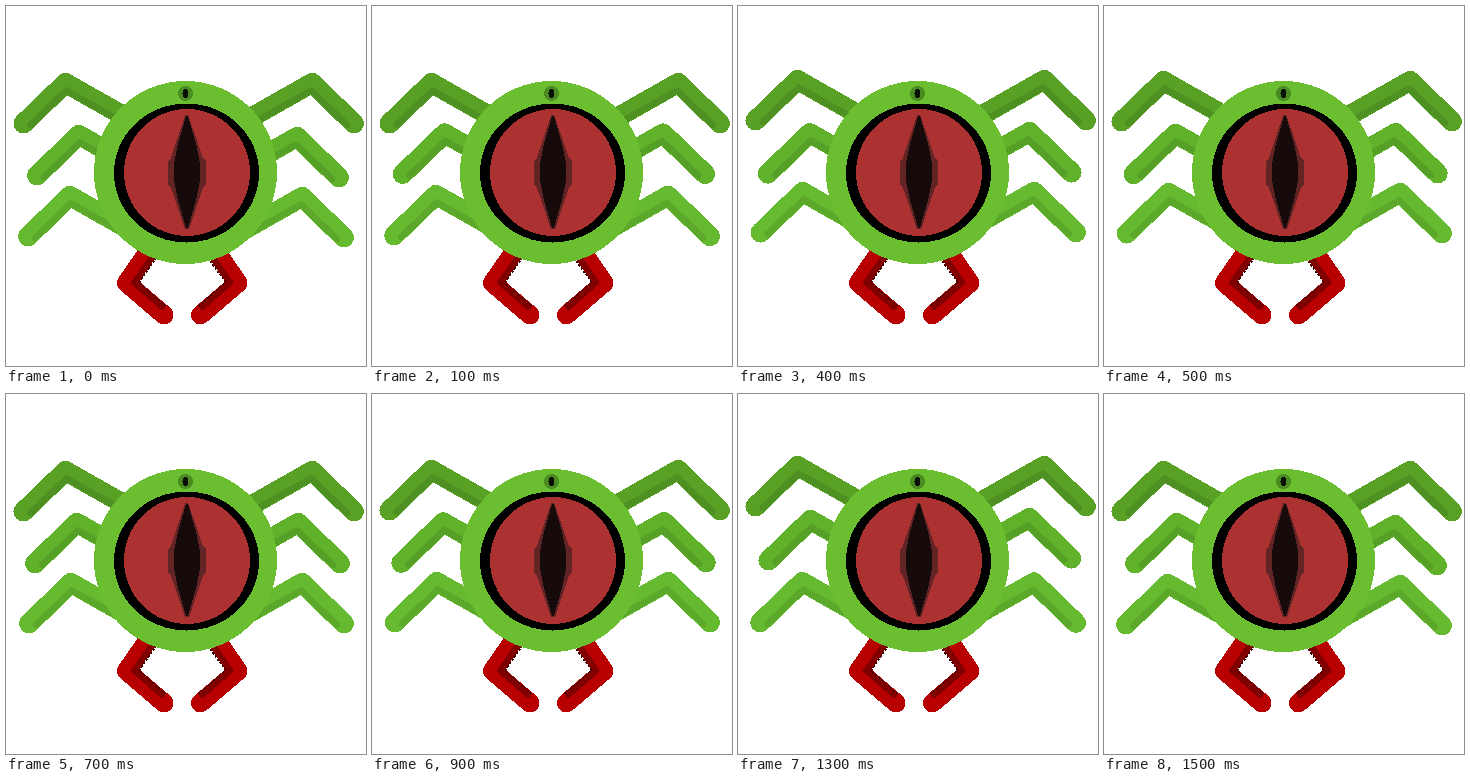
Recreate the animation shown at these times as an HTML page. Size 360 by 360 pixels, loop 1600 ms.

```html
<!DOCTYPE html>
<html lang="en">
<head>
<meta charset="utf-8">
<title>Eye spider</title>
<style>
  html, body { margin: 0; width: 100%; height: 100%; overflow: hidden; background: #fff; }
  svg { display: block; width: 100%; height: 100%; }
  .limb path { fill: none; stroke-linecap: round; stroke-linejoin: round; }
</style>
</head>
<body>
<svg viewBox="0 0 360 360" shape-rendering="crispEdges">
  <g id="legs"></g>
  <g id="claws"></g>
  <circle cx="179.5" cy="166.5" r="91.5" fill="#6abe30"/>
  <ellipse cx="180.5" cy="167" rx="72.5" ry="69.5" fill="#000"/>
  <ellipse cx="181" cy="166.5" rx="63" ry="63.5" fill="#ac3232"/>
  <path d="M179 109H182L192 137L197 152L200 155V178L197 182L183 223H179L165 182L162 178V155L165 152Z" fill="#622424"/>
  <path d="M180 110H182L190 138L194 157V175L190 194L182 222H180L172 194L168 175V157L172 138Z" fill="#160a0a"/>
  <circle cx="179.5" cy="87.5" r="7.5" fill="#4a8c22"/>
  <ellipse cx="179.5" cy="87.5" rx="3" ry="4.8" fill="#071003"/>
</svg>
<script>
const STEP = 100, LAST = 7;

// Each leg rises to its peak pose, sinks again, and drifts towards (driftX, driftY).
const upper = { light: '#58a125', shade: '#4e9022', start: 1, peak: 2 };
const middle = { light: '#61b22b', shade: '#56a027', start: 0, peak: 2 };
const lower = { light: '#66ba2f', shade: '#5ca82a', start: 0, peak: 4 };
const legs = [
  { ...upper, x: 59.5, y: 77, side: 1, lift: 5, driftX: 0, driftY: 0 },
  { ...upper, x: 306, y: 77, side: -1, lift: 5, driftX: 0, driftY: 0 },
  { ...middle, x: 73, y: 129, side: 1, lift: 3, driftX: -2, driftY: 0 },
  { ...middle, x: 291, y: 131, side: -1, lift: 6.4, driftX: 1, driftY: -2 },
  { ...lower, x: 64, y: 190, side: 1, lift: 3.4, driftX: 1, driftY: -1 },
  { ...lower, x: 296, y: 191, side: -1, lift: 4, driftX: 0, driftY: -2 }
];

function addLimb(parentId, markup) {
  const group = document.createElementNS('http://www.w3.org/2000/svg', 'g');
  group.setAttribute('class', 'limb');
  group.innerHTML = markup;
  document.getElementById(parentId).append(group);
  return group;
}

for (const leg of legs) {
  leg.node = addLimb('legs', `
    <path d="M-42 40.5L0 0L60 34" stroke="${leg.light}" stroke-width="20"/>
    <path d="M-35 42L1 7.4L57 39" stroke="${leg.shade}" stroke-width="6.5"/>`);
}

for (const mirror of ['', 'translate(352.5) scale(-1 1)']) {
  addLimb('claws', `
    <path d="M146 240L120.5 277L158 309" stroke="#b80000" stroke-width="19"/>
    <path d="M152 243L128.5 276.5L156 300.5" stroke="#800000" stroke-width="6.5"/>
    <path d="M155 246L133 276.5L160 300" stroke="#3a0000" stroke-width="1.5"
      stroke-dasharray="1 3"/>`).setAttribute('transform', mirror);
}

const clamp = value => Math.min(1, Math.max(0, value));

function placeLeg({ node, x, y, side, start, peak, lift, driftX, driftY }, pose) {
  const rise = clamp((pose - start) / (peak - start));
  const fall = clamp((LAST - pose) / (LAST - peak));
  const progress = pose / LAST;
  const left = x + driftX * progress;
  const top = y + driftY * progress - lift * Math.min(rise, fall);
  node.setAttribute('transform', `translate(${left} ${top}) scale(${side} 1)`);
}

function draw() {
  const step = Math.floor(performance.now() / STEP) % (2 * LAST + 2);
  const pose = Math.min(step, 2 * LAST + 1 - step);
  for (const leg of legs) placeLeg(leg, pose);
  requestAnimationFrame(draw);
}
draw();
</script>
</body>
</html>
```
